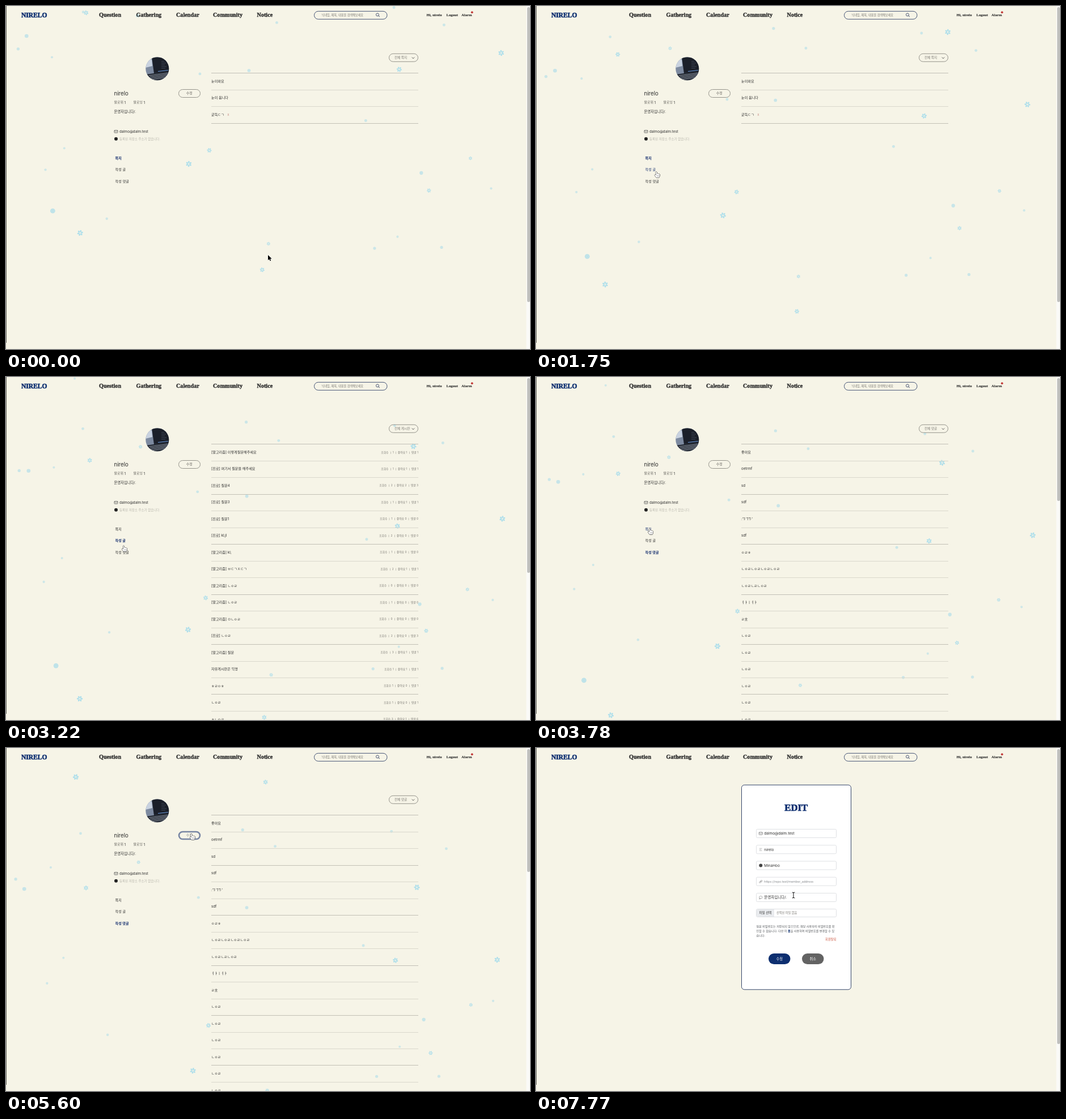
Write an HTML page with a canvas that moves like this. It is 924 px wide and 606 px high and loops after 8 s.

```html
<!DOCTYPE html>
<html lang="ko">
<head>
<meta charset="utf-8">
<title>My page</title>
<style>
html, body { margin: 0; width: 100%; height: 100%; overflow: hidden; background: #f6f4e7; }
canvas { display: block; width: 924px; height: 606px; }
</style>
</head>
<body>
<canvas id="stage"></canvas>
<script>
const W = 924, H = 606, LOOP = 8000, STEP = 70, TAU = Math.PI * 2;
const BG = '#f6f4e7', NAVY = '#0d2f70', INK = '#2e2e2e', GRAY = '#7b7973', EDGE = '#8b8982';
const SANS = 'Inter, "Noto Sans CJK KR", "Noto Sans CJK", sans-serif';
const SERIF = '"Liberation Serif", serif';
const NAME = 'nirelo', MAIL = 'dalmo@dalm.test', BIO = '운영자입니다/.';

const canvas = document.getElementById('stage');
const dpr = window.devicePixelRatio || 1;
canvas.width = W * dpr;
canvas.height = H * dpr;
const c = canvas.getContext('2d');

let seed = 41;
function random(min, max) {
  seed = (seed * 16807) % 2147483647;
  return min + (max - min) * seed / 2147483647;
}

// Large flakes: x, start y, speed; their sway phase follows the order
const large = [
  [355, 255, 42], [817, 269, 33], [745, 326, 38], [733, 295, 33], [325, 279, 52], [721, -45, 52],
  [456, 466, 42], [87, 362, 46], [235, 17, 33], [144, 12, 42], [464, 420, 33], [36, 53, 35],
  [871, 83, 52], [127, 401, 52], [689, 112, 47], [425, 114, 30]
].map(([x, y, v], i) => ({ x, y, v, phase: .1 + i * .06, crystal: i % 4 !== 3 }));

const small = Array.from({ length: 20 }, () => ({
  x: random(20, 905), y: random(-160, 440), v: random(20, 28), phase: random(0, 1), crystal: false
}));

const flakes = [...large, ...small];

const letters = ['눈이와요', '눈이 옵니다', '굳둑ㄷㄱ'];
// Post title | views, likes, comments
const posts = ['[알고리즘] 이렇게질문해주세요|111', '[진로] 여기서 질문을 해주세요|111', '[진로] 질문4|223',
  '[진로] 질문3|111', '[진로] 질문1|100', '[진로] kl;jl|200', '[알고리즘] kl;|100', '[알고리즘] ㅂㄷㄱㅈㄷㄱ|211',
  '[알고리즘] ㄴㅇㄹ|000', '[알고리즘] ㄴㅇㄹ|100', '[알고리즘] ㅁㄴㅇㄹ|000', '[진로] ㄴㅇㄹ|203', '[알고리즘] 질문|311',
  '자유게시판은 익명|111', 'ㅎㄹㅇㅎ|101', 'ㄴㅇㄹ|101', 'ㅎㄴㅇㄹ|316'];
const replies = ['좋아요', 'oetrmf', 'sd', 'sdf', ":'1:'1'1:'", 'sdf', 'ㅇㄹㅎ', 'ㄴㅇㄹ'.repeat(4), 'ㄴㅇㄹㄴㄹㄴㅇㄹ',
  'ㅕㅑㅣㅕㅑ', 'ㄹ호', ...Array(6).fill('ㄴㅇㄹ')];

const tabs = [
  { label: '쪽지', filter: '전체 쪽지', rows: letters, thumb: 523 },
  { label: '작성 글', filter: '전체 게시판', rows: posts, thumb: 346 },
  { label: '작성 댓글', filter: '전체 댓글', rows: replies, thumb: 219 }
];
const EDIT = 3;
const scenes = [[0, 0], [1960, 1], [3290, 2], [3850, 0], [4550, 2], [6020, EDIT]];

// Pointer stops: arrival time, x, y
const stops = [
  [0, 462, 440], [1050, 285, 257], [1600, 212, 293], [3000, 209, 306], [3720, 200, 267],
  [4300, 209, 304], [5400, 327, 152], [6860, 448, 212], [7210, 451, 250], [7770, 454, 260]
];
const TRAVEL = 700;

function text(s, x, y, size, color = INK, o = {}) {
  c.font = `${o.weight || 400} ${size}px ${o.font || SANS}`;
  c.textAlign = o.align || 'left';
  c.fillStyle = color;
  const base = y + size * (o.font ? .33 : .36);
  c.fillText(s, x, base);
  if (o.heavy) {
    c.strokeStyle = color;
    c.lineWidth = o.heavy;
    c.strokeText(s, x, base);
  }
}

function box(x, y, w, h, r, fill, stroke, lw = 1) {
  c.beginPath();
  c.roundRect(x, y, w, h, r);
  if (fill) { c.fillStyle = fill; c.fill(); }
  if (stroke) { c.strokeStyle = stroke; c.lineWidth = lw; c.stroke(); }
}

function dot(x, y, r, fill) {
  c.beginPath();
  c.arc(x, y, r, 0, TAU);
  c.fillStyle = fill;
  c.fill();
}

function poly(fill, ...pts) {
  c.beginPath();
  pts.forEach(([x, y]) => c.lineTo(x, y));
  c.closePath();
  c.fillStyle = fill;
  c.fill();
}

function line(color, lw, ...pts) {
  c.beginPath();
  pts.forEach(([x, y]) => c.lineTo(x, y));
  c.strokeStyle = color;
  c.lineWidth = lw;
  c.stroke();
}

function envelope(x, y, color) {
  box(x - 3, y - 2.2, 6, 4.4, .6, null, color, .7);
  line(color, .6, [x - 3, y - 1.6], [x, y + .5], [x + 3, y - 1.6]);
}

// Size, fall speed and sway width go together
function drawFlake({ x, y, v, phase, crystal }, t) {
  const r = v * .1, sway = 1.2 + .075 * v;
  let top = y + v * t;
  if (top > 625) top -= 641;
  c.save();
  c.translate(x + sway * Math.cos(TAU * (t / 4.4 - phase)), top);
  c.globalAlpha = Math.min(.95, .35 + r * .13);
  if (crystal) c.rotate(phase * TAU + t * .4);
  else dot(0, 0, r * .95, '#b8e0e9');
  for (let i = 0; i < 6; i++) {
    c.rotate(TAU / 6);
    if (!crystal) {
      dot(0, -r * .5, r * .12, '#d3eae8');
      continue;
    }
    c.beginPath();
    c.ellipse(0, -r * .64, r * .27, r * .36, 0, 0, TAU);
    c.fillStyle = '#aaddeb';
    c.fill();
    line('#aaddeb', r * .16, [0, -r * .2], [0, -r * .6]);
  }
  c.restore();
}

function header() {
  const bold = { font: SERIF, weight: 700, heavy: .35 };
  text('NIRELO', 27, 16.5, 11.5, NAVY, { ...bold, heavy: .6 });
  [['Question', 164], ['Gathering', 229.5], ['Calendar', 300], ['Community', 365], ['Notice', 442.5]]
    .forEach(([s, x]) => text(s, x, 16, 10.2, INK, bold));
  box(543.5, 9.3, 128.5, 14, 7, null, '#34456b', .9);
  text('닉네임, 제목, 내용을 검색해보세요', 556.5, 16.2, 5.15, GRAY);
  c.beginPath();
  c.arc(655, 15.3, 2.5, 0, TAU);
  c.strokeStyle = '#27355a';
  c.lineWidth = .8;
  c.stroke();
  line('#27355a', .9, [656.9, 17.1], [659, 19.2]);
  [['Hi, ' + NAME, 741.5], ['Logout', 776.5], ['Alarm', 803]]
    .forEach(([s, x]) => text(s, x, 16, 6.7, INK, { ...bold, heavy: .1 }));
  dot(821.8, 11.2, 1.9, '#c23a3a');
}

function avatar() {
  c.save();
  c.beginPath();
  c.arc(266.8, 110.8, 20.5, 0, TAU);
  c.clip();
  c.fillStyle = '#7d8aa0';
  c.fillRect(246, 90, 42, 42);
  poly('#c9d2e0', [246, 96], [257, 94], [258, 106], [246, 109]);
  poly('#1b1f29', [257, 90], [288, 91], [288, 116], [261, 119]);
  for (let i = 0; i < 5; i++) line('#555e70', .6, [274, 98 + i * 3], [279 + i * 3 % 5, 98 + i * 3]);
  line('#6f9fe0', 1, [268, 115.5], [286, 113.5]);
  poly('#252a34', [246, 121], [288, 115], [288, 132], [246, 132]);
  for (let i = 0; i < 4; i++) line('#b4bcc8', .7, [252 + i * 2, 123 + i * 2.3], [285, 118.5 + i * 2.3]);
  c.restore();
}

function profile(t, tab, px, py) {
  avatar();
  text(NAME, 190.5, 154.3, 9.7);
  if (t >= 5480) box(305, 148, 37, 13, 6.5, null, '#7886a4', 2.6);
  else box(304.5, 147.5, 38, 14, 7, null, EDGE, .9);
  text('수정', 323.3, 154.2, 6, overButton(px, py) ? '#8b8d90' : '#66645f', { align: 'center' });
  [['팔로워', 190.5], ['팔로잉', 224.5]].forEach(([s, x]) => {
    text(s, x, 170.3, 6, '#66645f');
    text('1', x + 18, 170.3, 6.2);
  });
  text(BIO, 190.5, 186.3, 6.3);
  envelope(194, 221.8, '#444');
  text(MAIL, 200, 222, 6.2);
  dot(194, 234.8, 3, '#222');
  text('등록된 저장소 주소가 없습니다.', 200, 235, 5.5, '#b7b5ab');
  tabs.forEach((d, i) => {
    const on = i === tab, lit = on || hoverTab(px, py) === i;
    text(d.label, 192.6, 269 + i * 20.2, 6.1, lit ? '#17306f' : INK, { weight: on ? 600 : 400 });
  });
}

function board(tab) {
  const { filter, rows } = tabs[tab], gap = 29.47;
  box(675.5, 84.3, 51, 14, 7, null, EDGE, .9);
  text(filter, 685, 91.2, 5.6, GRAY);
  line('#444', .9, [715.8, 90.6], [718, 92.8], [720.2, 90.6]);
  for (let i = 0; i <= rows.length; i++) {
    c.fillStyle = i % 3 ? '#dad8cc' : '#c2c0b6';
    c.fillRect(362, Math.round(118.4 + i * gap), 365, 1);
  }
  rows.forEach((row, i) => {
    const y = 132.8 + i * gap, [title, stats] = row.split('|');
    text(title, 362, y, 6.15);
    if (!stats) return;
    const [views, likes, notes] = stats;
    const sep = title.startsWith('[') ? ' ㅣ ' : ' ';
    text(`조회수${sep}${views} ㅣ 좋아요 ${likes} ㅣ 댓글 ${notes}`, 727, y, 4.85, GRAY, { align: 'right' });
  });
  if (tab === 0) text('x', 390.2, 191.6, 6.2, '#c98f88');
}

function editor() {
  box(362.5, 65.3, 193, 361.5, 5, '#fff', '#34456b', 1);
  text('EDIT', 458.8, 105.8, 16.8, NAVY, { font: SERIF, weight: 700, align: 'center', heavy: .7 });
  const hint = 'https://repo.test/member_address';
  [MAIL, NAME, 'MinaHoo', hint, BIO].forEach((s, i) => {
    const y = 151 + i * 28.25, empty = s === hint;
    box(388.5, y - 7.5, 141, 15, 2, '#fff', '#dfe1e4', 1);
    text(s, 402.3, y, empty ? 5.4 : 6.5, empty ? '#85888c' : INK);
  });
  envelope(396.3, 151, '#666');
  for (let i = 0; i < 3; i++) line('#999', .6, [393.8, 177.4 + i * 2], [398.6 - i % 2, 177.4 + i * 2]);
  dot(396.3, 207.6, 3, '#444');
  c.save();
  c.translate(396.3, 236);
  c.rotate(-.7);
  box(-3, -1, 3.4, 2, 1, null, '#777', .6);
  box(-.4, -1, 3.4, 2, 1, null, '#777', .6);
  c.restore();
  box(393.6, 261.6, 5.4, 4.4, 2.2, null, '#777', .6);
  line('#777', .6, [394.4, 265.3], [393.6, 267], [396, 266]);

  box(388.5, 284.5, 141, 14, 2, '#fff', '#dfe1e4', 1);
  box(389, 285, 31, 13, [2, 0, 0, 2], '#e9ebee');
  text('파일 선택', 393.5, 291.5, 5.5);
  text('선택된 파일 없음', 424, 291.5, 5.2, GRAY);

  const note = '#55585c';
  text('원본 비밀번호는 저장되지 않으므로, 해당 사용자의 비밀번호를 확', 388.5, 315.3, 5.1, note);
  let x = 388.5;
  [['인할 수 없습니다. 다만 이 ', note, 400], ['폼', NAVY, 700], ['을 사용하여 비밀번호를 변경할 수 있', note, 400]]
    .forEach(([s, color, weight]) => {
      text(s, x, 323, 5.1, color, { weight });
      x += c.measureText(s).width;
    });
  text('습니다.', 388.5, 330.8, 5.1, note);
  text('회원탈퇴', 529.5, 338.5, 5.3, '#cc5a44', { align: 'right' });

  [['수정', 410, NAVY], ['취소', 469, '#636363']].forEach(([s, bx, fill]) => {
    box(bx, 363, 38.5, 19, 9.5, fill);
    text(s, bx + 19.2, 372.4, 6.3, '#fff', { align: 'center', weight: 500 });
  });
}

const overButton = (x, y) => x > 304 && x < 343 && y > 147 && y < 162;

function hoverTab(x, y) {
  const i = Math.round((y - 269) / 20.2 - .2);
  return x > 191 && x < 219 && y > 262 && y < 317 ? i : -1;
}

// Rest at a stop, then ease to the next one just in time
function pointerAt(t) {
  const i = stops.findIndex(s => s[0] > t);
  if (i < 0) return stops[stops.length - 1].slice(1);
  const [t0, x0, y0] = stops[i - 1], [t1, x1, y1] = stops[i];
  const p = Math.max(0, 1 - (t1 - t) / Math.min(TRAVEL, t1 - t0));
  const e = p * p * (3 - 2 * p);
  return [x0 + (x1 - x0) * e, y0 + (y1 - y0) * e];
}

function outline(path, fill, stroke) {
  const p = new Path2D(path);
  c.lineJoin = 'round';
  c.strokeStyle = stroke;
  c.lineWidth = 1;
  c.stroke(p);
  c.fillStyle = fill;
  c.fill(p);
}

function pointer(x, y, scene) {
  c.save();
  c.translate(x, y);
  if (scene === EDIT && x > 388 && x < 530) {
    c.lineCap = 'round';
    [['#fff', 2], ['#111', 1]].forEach(([color, lw]) => {
      line(color, lw, [0, -4.4], [0, 4.4]);
      line(color, lw, [-2, -5], [0, -4.4], [2, -5]);
      line(color, lw, [-2, 5], [0, 4.4], [2, 5]);
    });
  } else if (scene !== EDIT && (overButton(x, y) || hoverTab(x, y) >= 0)) {
    outline('M-.9 .3Q0-.8 1 .3L1.5 3.2Q2.7 2.6 3.3 3.5Q4.5 3 5 4Q6.3 3.6 6.4 5L6 7.6L5.2 10H0L-2.8 6.2Q-3.2 4.9-1.8 5L-.3 6.2Z', '#fff', '#111');
    [1.6, 3.1, 4.6].forEach(lx => line('#777', .5, [lx, 6], [lx, 8.5]));
  } else {
    outline('M0 0V9.2L2.2 7.2L3.7 10.4L5.2 9.7L3.7 6.7L6.6 6.5Z', '#000', '#fff');
  }
  c.restore();
}

function draw(t) {
  const scene = scenes.filter(s => s[0] <= t).pop()[1];
  const editing = scene === EDIT, [px, py] = pointerAt(t);
  c.setTransform(dpr, 0, 0, dpr, 0, 0);
  c.fillStyle = BG;
  c.fillRect(0, 0, W, H);
  if (!editing) flakes.forEach(f => drawFlake(f, t / 1000));
  header();
  if (editing) editor();
  else {
    profile(t, scene, px, py);
    board(scene);
  }
  c.fillStyle = '#fafaf7';
  c.fillRect(917.5, 0, 6.5, H);
  box(919, 2, 5, (editing ? 523 : tabs[scene].thumb) - 2, 2.5, '#c0c0be');
  c.fillStyle = '#66655f';
  c.fillRect(0, 0, 1, 595);
  pointer(px, py, scene);
}

function frame() {
  const t = performance.now() % LOOP;
  draw(Math.floor(t / STEP) * STEP);
  requestAnimationFrame(frame);
}
frame();
</script>
</body>
</html>
```
